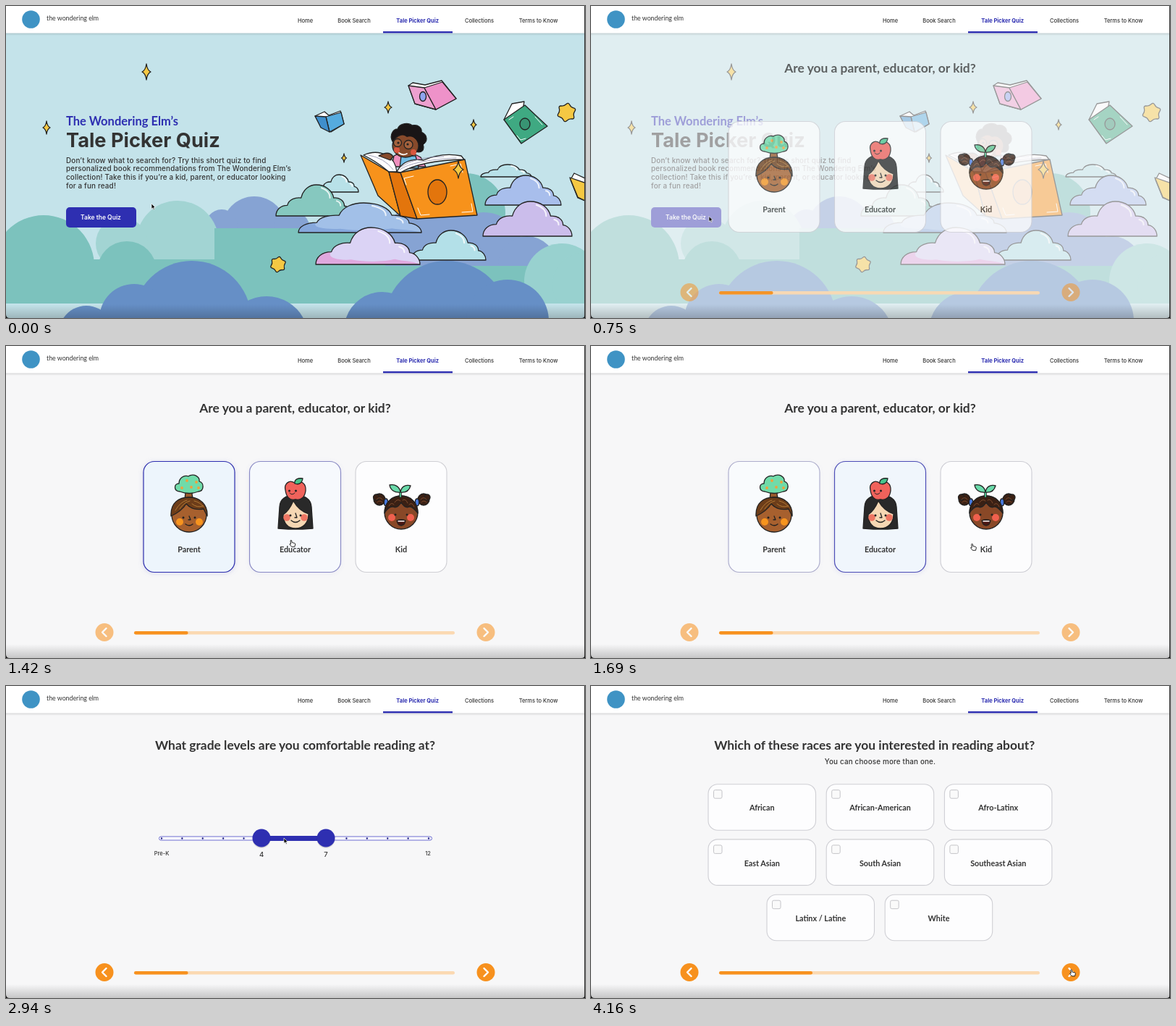
An HTML page that plays this animation: 800 px wide and 431 px high, repeating every 4.18 s.

```html
<!DOCTYPE html>
<html lang="en">
<head>
<meta charset="utf-8">
<title>Reading quiz</title>
<style>
html, body { margin: 0; width: 100%; height: 100%; overflow: hidden; background: #f7f7f8; }
svg { display: block; width: 100%; height: 100%; }
text { fill: #333; font-family: Inter, sans-serif; font-weight: 500; }
.mid { text-anchor: middle; }
.nav { font-size: 7.5px; }
.brand { font: 400 8.8px Lato, sans-serif; }
.head { font: 700 17.4px Lato, sans-serif; }
.label { font: 700 10.8px Lato, sans-serif; }
.body { font-size: 9.9px; letter-spacing: .16px; }
.ink { stroke: #222; stroke-width: 1.3; stroke-linejoin: round; stroke-linecap: round; }
.cloud { vector-effect: non-scaling-stroke; }
</style>
</head>
<body>
<svg id="stage" viewBox="0 0 800 431" preserveAspectRatio="none"></svg>
<script>
const LOOP = 4180;
const BLUE = '#2e2fb1', ORANGE = '#f7911e', INK = '#222';
const TEAL = '#7cc2bd', PALE_TEAL = '#a2d4d3', FAR_BLUE = '#86a3d3', NEAR_BLUE = '#668fc6';

const text = (x, y, str, cls = 'body', extra = '') => `<text x="${x}" y="${y}" class="${cls}" ${extra}>${str}</text>`;
const disc = (x, y, r, fill, cls = '') => `<circle cx="${x}" cy="${y}" r="${r}" fill="${fill}" class="${cls}"/>`;
const oval = (x, y, rx, ry, fill, cls = '') => `<ellipse cx="${x}" cy="${y}" rx="${rx}" ry="${ry}" fill="${fill}" class="${cls}"/>`;
const box = (x, y, w, h, r, fill, extra = '') => `<rect x="${x}" y="${y}" width="${w}" height="${h}" rx="${r}" fill="${fill}" ${extra}/>`;
const shape = (d, fill, cls = 'ink') => `<path d="${d}" fill="${fill}" class="${cls}"/>`;
const stroke = (d, color, width) => `<path d="${d}" fill="none" stroke="${color}" stroke-width="${width}" stroke-linecap="round" stroke-linejoin="round"/>`;
const group = (id, inner) => `<g id="${id}">${inner}</g>`;

// Circles [x, radius, crest] cut off at a common base line
const bank = (fill, base, bumps) => bumps.map(([x, r, crest]) => {
  const cy = crest + r;
  if (cy + r <= base) return disc(x, cy, r, fill);
  const h = Math.sqrt(r * r - (base - cy) ** 2);
  return shape(`M${x - h} ${base}A${r} ${r} 0 ${base > cy ? 1 : 0} 1 ${x + h} ${base}Z`, fill, '');
}).join('');

const CLOUD = 'M0 1C0 .8 .06 .66 .15 .66C.17 .46 .26 .4 .33 .42C.36 .12 .45 0 .53 0C.65 0 .74 .18 .76 .42C.84 .4 .9 .52 .9 .68C.96 .7 1 .85 1 1Z';
const cloud = (x, y, w, h, fill, shade = fill) => `<g transform="translate(${x} ${y}) scale(${w} ${h})">
  <path d="${CLOUD}" fill="${fill}"/>
  <path d="M0 1C0 .8 .06 .66 .15 .66C.1 .8 .2 .9 .34 .87C.5 .96 .66 .92 .76 .86C.84 .92 .92 .9 1 1Z" fill="${shade}"/>
  <path d="${CLOUD}" fill="none" class="ink cloud"/>
  <path d="M.6 .1C.68 .17 .71 .3 .71 .42M.8 .52C.84 .55 .85 .6 .85 .67" fill="none" stroke="#fff" stroke-width="2" stroke-linecap="round" opacity=".8" class="cloud"/></g>`;

const sparkle = (x, y, w, h) =>
  shape(`M${x} ${y - h}Q${x + w * .2} ${y - h * .2} ${x + w} ${y}Q${x + w * .2} ${y + h * .2} ${x} ${y + h}Q${x - w * .2} ${y + h * .2} ${x - w} ${y}Q${x - w * .2} ${y - h * .2} ${x} ${y - h}Z`, '#f5c843');

const roundStar = (x, y, r) => {
  const at = i => {
    const a = i * Math.PI / 6 - 1.4, d = i % 2 ? r * .74 : r * 1.16;
    return [x + d * Math.cos(a), y + d * Math.sin(a)];
  };
  const between = i => at(i).map((v, k) => (v + at(i + 1)[k]) / 2).join(' ');
  const curves = Array.from({ length: 12 }, (_, i) => `Q${at(i + 1).join(' ')} ${between(i + 1)}`);
  return shape(`M${between(0)}${curves.join('')}Z`, '#f5c843');
};

const smallBooks = () => [
  shape('M427 152L440 146L446 151L462 145L467 163L449 174L436 168Z', '#fff'),
  shape('M442 153L463 147L467 163L447 174Z', '#55abdf'),
  shape('M427 152L442 153L447 174L435 168Z', '#3f8fcc'),
  shape('M556 110L562 106L579 109L602 103L622 128L594 143L565 135Z', '#fff'),
  shape('M556 110L578 113L594 143L565 135Z', '#eda0cf'),
  shape('M578 113L603 105L622 128L594 143Z', '#ee92c9'),
  oval(576, 125, 4.5, 6.5, '#8fa4ee', 'ink'),
  shape('M688 157L699 135L716 132L713 148Z', '#fff'),
  shape('M688 157L717 137L748 166L712 190Z', '#3fa982'),
  stroke('M695 157L701 153M731 153L741 164M718 183L711 185L706 179', '#fff', 1),
  oval(717, 163, 7, 8, '#389473', 'ink'),
  shape('M780 240L785 231L802 239V270L790 265Z', '#fff'),
  shape('M779 237L802 245V270L790 264Z', '#f5c843')
].join('');

const reader = () => [
  shape('M536 207Q554 198 573 209L580 222H533Z', '#ee8fbd'),
  shape('M546 207H566L570 224H544Z', '#72bce3'),
  shape('M534 187C529 177 536 170 541 170C544 161 557 161 561 165C570 163 575 169 574 174C584 179 582 188 576 191C579 199 574 204 566 201L540 192Z', '#191516'),
  oval(552, 193, 18, 16, '#874a2b', 'ink'),
  shape('M534 187C538 176 550 177 554 181C561 178 570 184 572 197L579 189L572 169L547 166L535 175Z', '#191516', ''),
  disc(540, 199, 4, '#d9573f'), disc(563, 202, 4, '#d9573f'),
  disc(541, 189, 5.5, '#a4623d', 'ink'), disc(556, 191.5, 6, '#a4623d', 'ink'),
  disc(542, 189, 1.6, INK), disc(555, 191, 1.6, INK),
  stroke('M543 203Q548 207 554 204', '#fff', 1.7)
].join('');

const bigBook = () => [
  shape('M490 206L529 229L545 290L514 262Z', '#f7921b'),
  shape('M529 229L545 230L568 294L545 290Z', '#e3750c'),
  shape('M545 230L634 212L651 289L568 294Z', '#f7921b'),
  shape('M494 206Q512 198 527 207Q538 213 540 229H529Q514 216 494 206Z', '#fff'),
  shape('M540 229Q550 209 577 213Q602 202 629 207L633 212Q575 213 545 230Z', '#fff'),
  stroke('M501 206Q523 210 535 226M544 226Q563 213 622 210M546 222Q566 208 605 208', '#8b8ba8', .8),
  shape('M515 207Q529 199 535 208L531 213Z', '#874a2b'),
  oval(596, 257, 13, 17, '#e3750c', 'ink'),
  stroke('M553 247L550 238L563 235M614 221L628 218L631 230M643 273L645 284L630 285M585 288L573 289L569 279', '#fff', 1),
  sparkle(625, 226, 7, 12)
].join('');

const hero = () => [
  box(0, 37, 800, 394, 0, '#c4e3ea'),
  bank(FAR_BLUE, 308, [[343, 44, 263], [395, 25, 283], [298, 22, 281]]),
  bank(PALE_TEAL, 390, [[237, 57, 269], [160, 36, 292]]),
  bank(TEAL, 350, [[635, 55, 231]]),
  bank(TEAL, 411, [[52, 70, 289], [167, 41, 325]]),
  box(0, 350, 740, 61, 0, TEAL), box(288, 307, 290, 60, 0, TEAL),
  bank(FAR_BLUE, 359, [[590, 70, 265], [660, 55, 285], [720, 40, 318]]),
  bank('#98d1cf', 411, [[768, 52, 328], [800, 45, 340]]),
  bank(NEAR_BLUE, 431, [[257, 82, 352], [177, 48, 384], [360, 58, 401], [111, 38, 414]]),
  bank(NEAR_BLUE, 431, [[609, 87, 352], [693, 57, 378], [520, 53, 395]]),
  cloud(430, 233, 57, 24, '#b8e1e8'), cloud(373, 247, 105, 43, '#86c8bf'),
  cloud(404, 272, 170, 41, '#a2c0e8', '#86a8dc'), cloud(656, 219, 70, 17, '#b8e1e8'),
  cloud(662, 234, 105, 41, '#a8beec'), cloud(659, 270, 123, 48, '#cbbdeb'),
  cloud(560, 310, 103, 41, '#b3e0e8'), cloud(428, 306, 144, 51, '#dbd3f5', '#dfa8de'),
  sparkle(194, 91, 6, 11), sparkle(56, 168, 5, 9), sparkle(528, 140, 5, 8),
  sparkle(646, 164, 4, 7), sparkle(467, 210, 3.5, 6),
  roundStar(376, 357, 10.5), roundStar(774.5, 147, 12.5),
  smallBooks(), reader(), bigBook(),
  text(83, 165, 'The Wondering Elm’s', 'head', `style="fill:${BLUE};font-size:16.5px"`),
  text(83, 194.5, 'Tale Picker Quiz', '', 'style="font-size:27.2px;font-weight:700"'),
  ...['Don’t know what to search for? Try this short quiz to find',
    'personalized book recommendations from The Wondering Elm’s',
    'collection! Take this if you’re a kid, parent, or educator looking',
    'for a fun read!'].map((row, i) => text(83, 216.5 + i * 11.7, row)),
  box(83, 278, 97, 28, 5, BLUE),
  text(131, 295, 'Take the Quiz', 'mid', 'style="fill:#fff;font-size:8.5px;font-weight:600"')
].join('');

const eyes = (x, y, gap) => disc(x - gap, y, 1.5, INK) + disc(x + gap, y, 1.5, INK);

const parentFace = () => [
  shape('M247 211L248 203L243 200L252 201L261 199L257 204L258 211Z', '#9a5a2b'),
  shape('M240 201C231 200 232 190 239 190C239 182 246 178 252 180C260 175 268 181 267 187C274 189 274 200 266 201Q253 206 240 201Z', '#70dba9'),
  ...[[243, 196], [250, 186], [256, 195], [263, 188], [266, 196]].map(([x, y]) => disc(x, y, 1.9, '#f2a03a')),
  disc(253, 233, 24, '#a7602e', 'ink'),
  shape('M228 235C227 216 239 209 253 209C268 209 279 219 278 235L273 225Q258 228 249 218Q243 228 228 235Z', '#6d3d19'),
  stroke('M234 227Q241 215 250 213M240 225Q246 216 254 214M257 218Q264 224 272 221M260 214Q268 216 273 222', '#c3893d', .8),
  disc(240, 243, 5, '#f7941e'), disc(267, 243, 5, '#f7941e'),
  eyes(253, 237, 8), stroke('M253 235L255 240H252M248 246Q253 250 258 246', INK, 1.3)
].join('');

const educatorFace = () => [
  shape('M376 252L378 222C379 210 388 206 400 206C412 206 421 211 422 222L424 252L410 253H390Z', '#292929'),
  shape('M383 233C389 229 394 221 397 214C402 223 409 229 418 232C418 244 411 252 400 252C389 252 383 244 383 233Z', '#f5d7b3'),
  disc(388, 237, 4.8, '#ee7663'), disc(412, 237, 4.8, '#ee7663'),
  eyes(400, 234, 7), stroke('M400 231L402 237H399M394 241Q400 246 406 241', INK, 1.3),
  shape('M400 190C391 183 384 191 386 199C387 208 392 214 400 212C408 214 413 208 414 200C415 190 407 184 400 190Z', '#f0625b'),
  shape('M399 190C398 184 404 182 410 183C409 190 404 192 399 190Z', '#47c48c'),
  eyes(396, 200, 4.5), stroke('M392 203Q395 207 399 203', INK, 1)
].join('');

const kidFace = () => [
  ...[[516, 212, 507], [577, 212, 587]].map(([x, y, edge]) =>
    disc(x, y, 8, '#3a2014', 'ink') + disc((x + edge) / 2, y - 3, 4, '#3a2014', 'ink') +
    stroke(`M${x - 4} ${y}Q${x} ${y - 5} ${x + 4} ${y}M${x - 3} ${y + 4}Q${x} ${y} ${x + 4} ${y + 4}`, '#8a5230', .8)),
  oval(525, 216, 2.7, 5, '#4778dc', 'ink'), oval(568, 216, 2.7, 5, '#4778dc', 'ink'),
  disc(546, 230, 23, '#894827', 'ink'),
  shape('M523 231C523 216 533 207 546 207C559 207 569 216 569 231Q562 222 558 222Q551 225 546 216Q541 225 534 222Q528 222 523 231Z', '#3a2014'),
  stroke('M529 221Q532 215 536 219M537 216Q541 210 545 214M548 213Q552 210 555 217M557 219Q561 215 564 222', '#8a5230', .9),
  stroke('M545 208V202', INK, 3.6), stroke('M545 208V202', '#52c894', 1.8),
  shape('M545 202C537 203 531 199 530 192C538 190 544 195 545 202C546 195 551 191 559 193C557 200 552 203 545 202Z', '#6adaaa'),
  disc(533, 237, 5, '#f0604e'), disc(559, 237, 5, '#f0604e'),
  eyes(546, 233, 8), shape('M540 241Q546 239 552 241Q551 248 546 248Q541 248 540 241Z', '#4a1713'),
  stroke('M542 242H550', '#fff', 1.5)
].join('');

const CARD = 'stroke="#cfcfd4" stroke-width="1.1"';
const ROLES = [['Parent', 190, parentFace], ['Educator', 336.5, educatorFace], ['Kid', 483, kidFace]];
const rolePage = () => text(399.5, 92, 'Are you a parent, educator, or kid?', 'head mid') +
  ROLES.map(([name, x, face], i) =>
    box(x, 159.5, 126, 153, 15, '#fdfdfe', CARD) +
    group('hover' + i, box(x, 159.5, 126, 153, 15, '#edf5fc', `stroke="${BLUE}" stroke-width="1.2" filter="url(#glow)"`)) +
    face() + text(x + 63, 284.5, name, 'label mid')).join('');

const STEP = 369 / 13;
const gradePage = () => [
  text(399.5, 88, 'What grade levels are you comfortable reading at?', 'head mid'),
  box(211.5, 208, 377, 5, 2.5, '#fff', 'stroke="#5c5dcb" stroke-width=".9"'),
  ...Array.from({ length: 14 }, (_, i) => disc(215 + i * STEP, 210.5, 1.2, '#24248a')),
  box(353, 207, 89, 7, 0, BLUE),
  ...[353, 442].map(x => disc(x, 211.3, 12.6, '#0002') + disc(x, 210, 12.5, BLUE)),
  text(215, 234, 'Pre-K', 'nav mid'), text(583, 233.5, '12', 'nav mid'),
  text(353, 236, '4', 'mid', 'style="font-size:9.5px"'), text(442, 236, '7', 'mid', 'style="font-size:9.5px"')
].join('');

const choice = (name, x, y) => box(x, y, 148.5, 63.5, 13, '#fdfdfe', CARD) +
  box(x + 7.5, y + 8, 11.5, 11.5, 2, '#fafafa', 'stroke="#c4c4c8"') + text(x + 74.3, y + 36.7, name, 'label mid');
const racePage = () => [
  text(391.7, 87.5, 'Which of these races are you interested in reading about?', 'head mid'),
  text(399.5, 108, 'You can choose more than one.', 'body mid'),
  ...['African', 'African-American', 'Afro-Latinx', 'East Asian', 'South Asian', 'Southeast Asian']
    .map((name, i) => choice(name, 162 + i % 3 * 163.2, 135.7 + Math.floor(i / 3) * 76.2)),
  choice('Latinx / Latine', 243, 288.2), choice('White', 406.2, 288.2)
].join('');

const arrow = (x, dir) => disc(x, 395.5, 12.5, ORANGE) +
  stroke(`M${x - dir * 2.5} 390L${x + dir * 3} 395.5L${x - dir * 2.5} 401`, '#fff', 2.4);
const footer = () => box(177, 394, 443, 4.6, 2.3, '#fbd9b2') +
  box(177, 394, 74.5, 4.6, 2.3, ORANGE, 'id="progress"') +
  group('arrows', arrow(136, -1) + arrow(663, 1));

const header = () => [
  box(0, 36, 800, 5, 0, 'url(#drop)'), box(0, 0, 800, 37.5, 0, '#fff'),
  disc(34.5, 18.5, 12.3, '#3f93c4'), text(56, 20.3, 'the wondering elm', 'brand'),
  ...[['Home', 413.5], ['Book Search', 481], ['Collections', 654], ['Terms to Know', 735.5]]
    .map(([name, x]) => text(x, 23, name, 'nav mid')),
  text(568.7, 23, 'Tale Picker Quiz', 'nav mid', `style="fill:${BLUE};font-weight:700"`),
  box(521, 35, 96, 2.4, 0, BLUE)
].join('');

const frameEdge = () => box(0, 412, 800, 19, 0, 'url(#dock)') +
  box(799, 0, 1, 431, 0, '#3a3a3a') +
  shape('M0 426Q0 431 5 431H0ZM800 426Q800 431 795 431H800Z', '#111', '');

const pointer = () => group('cursor',
  group('tip', '<path d="M0 0V7.4L1.8 5.8L3 8.4L4.2 7.9L3.1 5.3H5.3Z" fill="#000" stroke="#fff" stroke-width=".7"/>') +
  group('hand', '<path d="M-.8 .8Q0 -.4 .9 .8L1.3 3.5L5 4.4Q6 4.7 5.8 6L5 9.3H.8L-2 5.8Q-1.7 4.6 -.3 5.5Z" fill="#fff" stroke="#111" stroke-width=".9"/>'));

const fadeDown = (id, a, b) => `<linearGradient id="${id}" x2="0" y2="1"><stop stop-color="#000" stop-opacity="${a}"/><stop offset="1" stop-color="#000" stop-opacity="${b}"/></linearGradient>`;

document.getElementById('stage').innerHTML = `<defs>${fadeDown('drop', .18, 0)}${fadeDown('dock', 0, .2)}
  <filter id="glow" x="-20%" y="-20%" width="140%" height="140%"><feDropShadow dx="0" dy="1" stdDeviation="3" flood-color="#8a90d0" flood-opacity=".3"/></filter></defs>` +
  box(0, 0, 800, 431, 0, '#f7f7f8') +
  group('hero', hero()) + group('roles', rolePage()) + group('grades', gradePage()) +
  group('races', racePage()) + group('footer', footer()) + header() + frameEdge() + pointer();

const el = id => document.getElementById(id);
const ramp = (t, from, to) => Math.min(1, Math.max(0, (t - from) / (to - from)));
const ease = k => k * k * (3 - 2 * k);
const fade = (id, k) => {
  el(id).setAttribute('opacity', k.toFixed(3));
  el(id).style.display = k > 0 ? '' : 'none';
};

const PATH = [[0, 201, 273], [80, 201, 273], [380, 163, 290.5], [1060, 163, 290.5], [1260, 255, 272],
  [1430, 395, 268], [1650, 526.5, 273], [2330, 527, 272], [2780, 384, 210], [3020, 384, 210], [3320, 663.5, 391.5], [LOOP, 663.5, 391.5]];
const HOVERS = [[1160, 1260, 1420, 1760], [1370, 1490, 1640, 1900], [1690, 1800, 1960, 2100]];
const HAND_TIMES = [[250, 600], [1180, 2080], [3270, LOOP]];

function cursorAt(t) {
  const i = PATH.findIndex((p, n) => n && t <= p[0]);
  const [t0, x0, y0] = PATH[i - 1], [t1, x1, y1] = PATH[i];
  const k = ease(ramp(t, t0, t1));
  return [x0 + (x1 - x0) * k, y0 + (y1 - y0) * k];
}

function render(t) {
  const toRoles = ramp(t, 600, 800), toGrades = ramp(t, 2080, 2400), toRaces = ramp(t, 3430, 3730);
  fade('hero', 1 - ramp(t, 600, 870));
  fade('roles', toRoles * (1 - toGrades));
  fade('grades', toGrades * (1 - toRaces));
  fade('races', toRaces);
  fade('footer', ramp(t, 600, 760));
  fade('arrows', .55 + .45 * toGrades);
  el('progress').setAttribute('width', 74.5 + 54.5 * ease(toRaces));
  HOVERS.forEach(([a, b, c, d], i) => fade('hover' + i, ramp(t, a, b) * (1 - ramp(t, c, d))));
  const [x, y] = cursorAt(t);
  const hand = HAND_TIMES.some(([a, b]) => t >= a && t < b);
  el('cursor').setAttribute('transform', `translate(${x.toFixed(2)} ${y.toFixed(2)})`);
  fade('hand', hand ? 1 : 0);
  fade('tip', hand ? 0 : 1);
}

const start = performance.now();
function tick() {
  render((performance.now() - start) % LOOP);
  requestAnimationFrame(tick);
}
tick();
</script>
</body>
</html>
```
